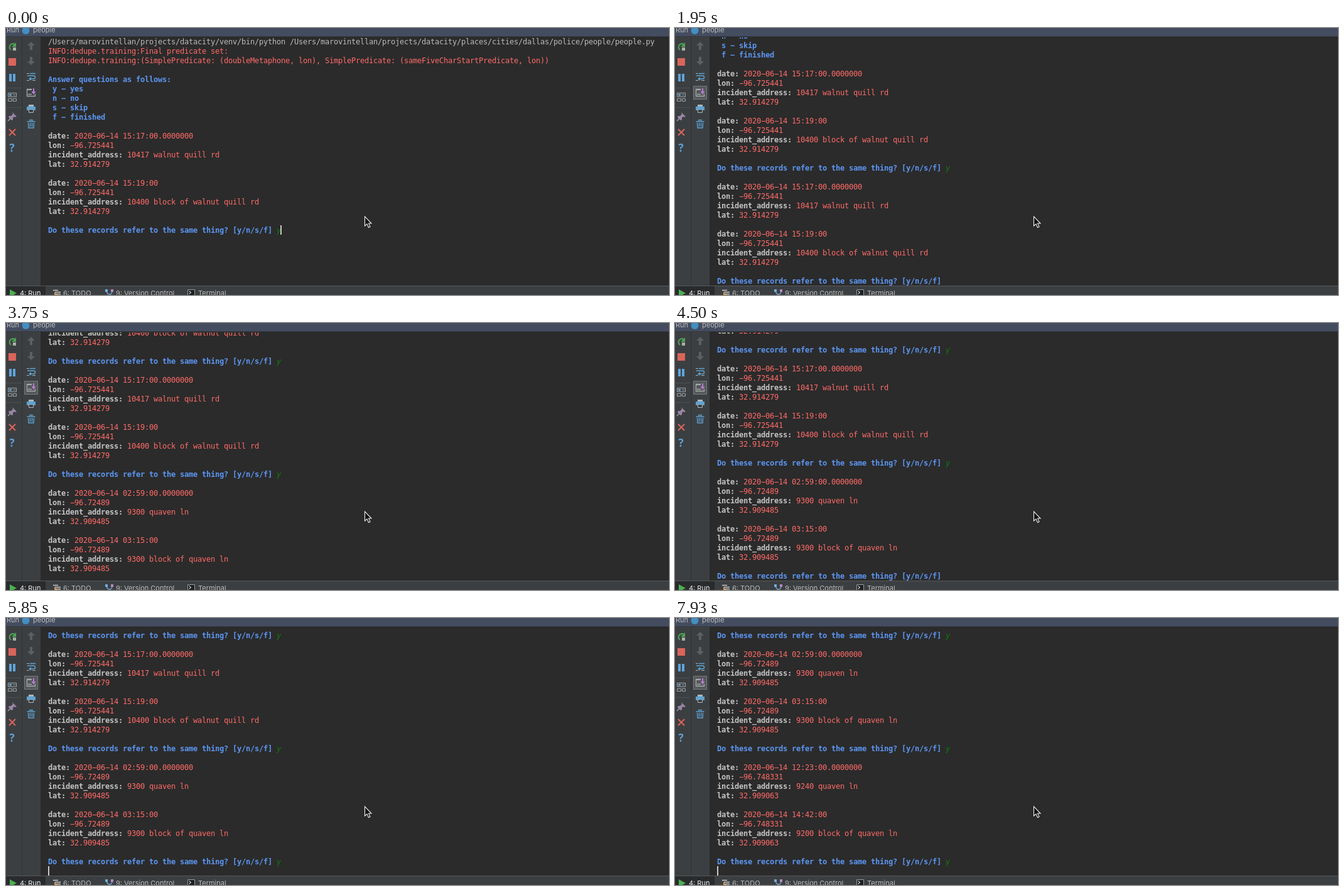
An HTML page with a canvas that plays this animation: 1056x425 px, repeating every 8 s.

```html
<!DOCTYPE html>
<html lang="en">
<head>
<meta charset="utf-8">
<title>Console</title>
<style>
  html, body { margin: 0; width: 100%; height: 100%; overflow: hidden; background: #2b2b2b; }
  canvas { display: block; }
</style>
</head>
<body>
<canvas id="stage" width="1056" height="425"></canvas>
<script>
const ctx = document.getElementById('stage').getContext('2d');
const LOOP = 8000, CELL = 7, ROW = 15, LEFT = 67, TOP = 14;
const MONO = '12px "DejaVu Sans Mono", monospace';
const UI = '11px Inter, "Open Sans", sans-serif';

const STYLES = {
  plain: ['#bbbbbb', MONO],
  label: ['#c4c4c4', 'bold ' + MONO],
  value: ['#ff6b68', MONO],
  ask: ['#5c96f2', 'bold ' + MONO],
  answer: ['#0b7d0b', 'italic ' + MONO]
};

// Console document: each line is a list of [style, text] runs.
const home = '/Users/marovintellan/projects/datacity';
const lines = [
  [['plain', `${home}/venv/bin/python ${home}/places/cities/dallas/police/people/people.py`]],
  [['value', 'INFO:dedupe.training:Final predicate set:']],
  [['value', 'INFO:dedupe.training:(SimplePredicate: (doubleMetaphone, lon), SimplePredicate: (sameFiveCharStartPredicate, lon))']],
  [],
  ...['Answer questions as follows:', ' y - yes', ' n - no', ' s - skip', ' f - finished'].map(s => [['ask', s]]),
  []
];
const promptRows = [];

function addRecord(time, lon, address, lat) {
  const fields = { date: '2020-06-14 ' + time, lon, incident_address: address, lat };
  for (const key in fields) lines.push([['label', key + ': '], ['value', fields[key]]]);
  lines.push([]);
}

function addPair(time1, time2, lon, lat, address1, address2) {
  addRecord(time1 + '.0000000', lon, address1, lat);
  addRecord(time2, lon, address2, lat);
  promptRows.push(lines.length);
  lines.push([['ask', 'Do these records refer to the same thing? [y/n/s/f] ']], []);
}

for (let i = 0; i < 2; i++)
  addPair('15:17:00', '15:19:00', '-96.725441', '32.914279', '10417 walnut quill rd', '10400 block of walnut quill rd');
addPair('02:59:00', '03:15:00', '-96.72489', '32.909485', '9300 quaven ln', '9300 block of quaven ln');
addPair('12:23:00', '14:42:00', '-96.748331', '32.909063', '9240 quaven ln', '9200 block of quaven ln');

// [start ms, scroll px, last row, answers given, caret column or -1]
const steps = [
  [0, 0, 20, 1, 53], [450, 0, 20, 1, -1], [1050, 0, 20, 1, 53], [1350, 0, 21, 1, 0],
  [1500, 99, 32, 1, 0], [1950, 99, 32, 1, -1], [2250, 99, 32, 2, 53],
  [3000, 99, 32, 2, -1], [3450, 99, 32, 2, 53], [3600, 114, 33, 2, 0], [3750, 261, 43, 2, -1],
  [3900, 279, 44, 2, 0], [4500, 279, 44, 2, -1], [4650, 279, 44, 3, 53],
  [5550, 279, 44, 3, -1], [5850, 294, 45, 3, 0], [5990, 441, 55, 3, -1],
  [6140, 459, 56, 3, 0], [6590, 459, 56, 3, -1], [7040, 459, 56, 3, 0],
  [7340, 459, 56, 4, 53], [7930, 474, 57, 4, 0]
];

function rect(color, x, y, w, h) {
  ctx.fillStyle = color;
  ctx.fillRect(x, y, w, h);
}

function fill(color, d) {
  ctx.fillStyle = color;
  ctx.fill(new Path2D(d));
}

function stroke(color, width, d) {
  ctx.strokeStyle = color;
  ctx.lineWidth = width;
  ctx.stroke(new Path2D(d));
}

function uiText(text, x, y, color = '#bbbbbb') {
  ctx.font = UI;
  ctx.letterSpacing = '0px';
  ctx.fillStyle = color;
  ctx.fillText(text, x, y);
}

function monoText(style, text, col, y) {
  [ctx.fillStyle, ctx.font] = STYLES[style];
  ctx.letterSpacing = '0px';
  ctx.letterSpacing = CELL - ctx.measureText('x').width + 'px';
  // The console face has a wide hyphen, close to a minus sign.
  ctx.fillText(text.replaceAll('-', '\u2212'), LEFT + col * CELL, y);
}

function drawConsole([, scroll, lastRow, answers, caretCol]) {
  ctx.save();
  ctx.beginPath();
  ctx.rect(55, 15, 1001, 395);
  ctx.clip();
  const rowTop = row => TOP + row * ROW - scroll;
  lines.slice(0, lastRow + 1).forEach((runs, row) => {
    if (rowTop(row) < -ROW) return;
    const y = rowTop(row) + 12;
    let col = 0;
    for (const [style, text] of runs) {
      monoText(style, text, col, y);
      col += text.length;
    }
    if (promptRows.slice(0, answers).includes(row)) monoText('answer', 'y', col, y);
  });
  if (caretCol >= 0)
    rect('#c8c8c8', Math.max(LEFT, LEFT - 1 + caretCol * CELL), rowTop(lastRow), 2, ROW);
  ctx.restore();
}

function drawRunIcons() {
  stroke('#4fa457', 2, 'M14 26A5.2 5.2 0 1 0 8 35');
  fill('#4fa457', 'M16 23V30H9Z');
  rect('#a9b0a9', 11, 31, 5, 5);
  rect('#d9655b', 4, 48, 12, 12);
  rect('#5fa5dc', 5, 73, 4, 12);
  rect('#5fa5dc', 11, 73, 4, 12);
  for (const y of [95, 126])
    for (let x = 1; x < 24; x += 2) rect('#606366', x, y, 1, 1);
  stroke('#a2a8ac', 1, 'M3.5 103.5H16.5V109.5H3.5ZM3.5 112.5H9.5V116.5H3.5ZM11.5 112.5H16.5V116.5H11.5Z');
  rect('#6b9fc4', 5, 105, 4, 3);
  rect('#a2a8ac', 11, 106, 4, 1);
  fill('#9b84a8', 'M10 134L17 141L15 142L13 141L11 143L11 146L9 147L4 142L5 140L8 140L11 137Z');
  stroke('#a5a5a5', 1.3, 'M7 144L3 148');
  stroke('#dc645c', 2, 'M5 161L15 171M15 161L5 171');
  ctx.font = 'bold 17px "Open Sans", sans-serif';
  ctx.letterSpacing = '0px';
  ctx.fillStyle = '#5aa2dc';
  ctx.fillText('?', 5.5, 197);
}

function drawConsoleIcons(pressed) {
  if (pressed) {
    rect('#555859', 29, 92, 22, 22);
    stroke('#777a7c', 1, 'M29.5 92.5H50.5V113.5H29.5Z');
  }
  fill('#5d6062', 'M40 22L46 28H42V35H38V28H34Z');
  fill('#5d6062', 'M40 59L46 53H42V46H38V53H34Z');
  stroke('#a9afb3', 1, 'M33 72.5H37M33 83.5H37M42 83.5H47');
  stroke('#5da2d2', 1.4, 'M34 76H44Q46.5 76 46.5 78.5T44 81H38M38 72.5H47');
  fill('#5da2d2', 'M40 78V84L36 81Z');
  stroke('#a4a9ad', 1.3, 'M41 97.5H33.5V108.5H46.5V105M35 105.5H41');
  rect('#a4a9ad', 33, 97, 8, 2);
  stroke('#b57bd0', 2, 'M44 96V102');
  fill('#b57bd0', 'M40.5 101H47.5L44 106Z');
  rect('#a9b7c0', 36, 122, 8, 3);
  rect('#5da2d2', 33, 125, 14, 6);
  rect('#3c3f41', 36, 129, 8, 2);
  stroke('#a9b7c0', 1, 'M36.5 129.5H43.5V134.5H36.5Z');
  stroke('#5da2d2', 1.4, 'M33.5 149H46.5M38 148V146.5H42V148M35.5 151L36 159H44L44.5 151M38.5 151V157M41.5 151V157');
}

function drawFrame(pressed) {
  rect('#2b2b2b', 0, 0, 1056, 425);
  rect('#444d60', 0, 0, 1056, 13);
  rect('#343941', 0, 13, 1056, 1);
  uiText('Run', 1, 7);
  uiText('people', 43, 7);
  fill('#438fc0', 'M25.5 4a6 6 0 1 0 12 0a6 6 0 1 0 -12 0');

  rect('#3c3f41', 0, 14, 55, 396);
  rect('#303335', 25, 14, 1, 396);
  drawRunIcons();
  drawConsoleIcons(pressed);

  rect('#3c3f41', 0, 410, 1056, 15);
  rect('#55585a', 0, 410, 1056, 1);
  rect('#292b2d', 0, 411, 63, 14);
  fill('#4caf50', 'M6 416L17 422L6 428Z');
  uiText('4: Run', 22, 426, '#eeeeee');
  uiText('6: TODO', 91, 426);
  uiText('9: Version Control', 175, 426);
  uiText('Terminal', 306, 426);

  stroke('#c9c9c9', 1.4, 'M75 417.5H83M78 420.5H87M80 423.5H87');
  fill('#d99a4e', 'M77 420L82 425H77Z');
  stroke('#7295bd', 1.6, 'M160 418Q161 424 165 424V428M169 418Q169 424 165 424');
  fill('#6fb2df', 'M158 416H162V420H158Z');
  fill('#b78bc9', 'M167 416H171V420H167Z');
  rect('#1e1f20', 289, 416, 12, 9);
  stroke('#9a9d9f', 1, 'M289.5 425V416.5H300.5V425');
  stroke('#d0d0d0', 1.1, 'M291.5 418.5L294.5 421L291.5 423.5');
}

function drawPointer() {
  const arrow = 'M571.5 300V315L575 311.8L577.5 317.5L580 316.4L577.6 311H582Z';
  fill('#111111', arrow);
  stroke('#f2f2f2', 1.1, arrow);
}

function draw() {
  const t = performance.now() % LOOP;
  drawFrame(t >= 450);
  drawConsole(steps.findLast(step => step[0] <= t));
  drawPointer();
  requestAnimationFrame(draw);
}
draw();
</script>
</body>
</html>
```
